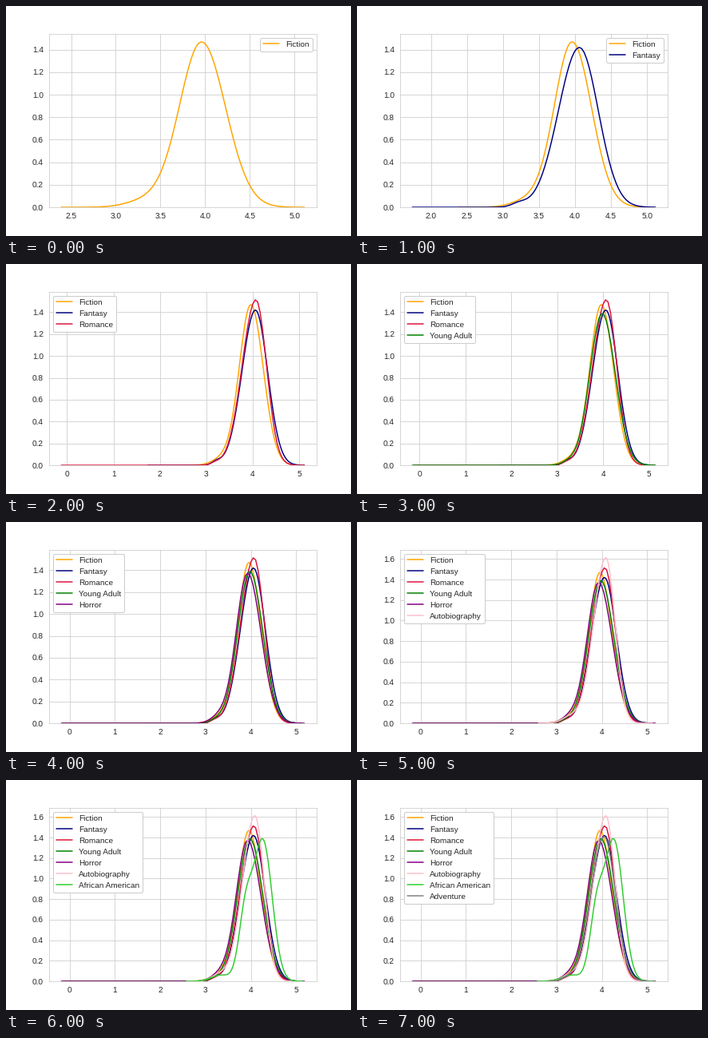
Write a matplotlib script that moves like this. It is 432 px wide and 288 px high and loops after 8 s.

```python
import numpy as np
import matplotlib.pyplot as plt
from matplotlib.animation import FuncAnimation

plt.rcParams.update({
    "font.family": "Liberation Sans",
    "font.size": 10,
    "text.color": "0.15",
    "text.hinting": "native",
    "axes.edgecolor": "0.8",
    "axes.axisbelow": True,
    "axes.grid": True,
    "grid.color": "0.8",
    "grid.linestyle": "-",
    "xtick.color": "0.15",
    "ytick.color": "0.15",
    "xtick.bottom": False,
    "ytick.left": False,
    "lines.solid_capstyle": "round",
    "legend.framealpha": 1,
})

curves = []


def bell(x, height, centre, left, right):
    """Gaussian with its own width on each side."""
    width = np.where(x < centre, left, right)
    return height * np.exp(-0.5 * ((x - centre) / width) ** 2)


def add(name, color, lo, hi, *bells):
    x = np.linspace(lo, hi, 100)
    curves.append((name, color, x, sum(bell(x, *b) for b in bells)))


# Each density is a main bell plus a small foot on its left side.
add("Fiction", "orange", 2.39, 5.11,
    (1.468, 3.96, .247, .268), (.06, 3.35, .22, .22))
add("Fantasy", "navy", 1.742, 5.114,
    (1.42, 4.06, .29, .262), (.03, 3.22, .1, .1))
add("Romance", "crimson", -.125, 5.113,
    (1.515, 4.07, .296, .228), (.02, 3.2, .1, .1))
add("Young Adult", "green", -.16, 5.14,
    (1.39, 3.98, .27, .285), (.03, 3.25, .15, .15))
add("Horror", "purple", -.185, 5.183,
    (1.375, 3.93, .253, .295), (.06, 3.3, .18, .18))
add("Autobiography", "pink", 2.6, 5.12,
    (1.613, 4.09, .275, .204), (.06, 3.3, .18, .18))
add("African American", "limegreen", 2.57, 5.15,
    (1.36, 4.27, .2, .203), (.66, 3.89, .15, .15), (.06, 3.35, .22, .22))
add("Adventure", "gray", 2.8, 5.05,
    (1.41, 4.05, .295, .25), (.03, 3.25, .12, .12))

fig, ax = plt.subplots(figsize=(6, 4), dpi=72)
fig.subplots_adjust(left=0.125, right=0.9, bottom=0.125, top=0.88)


def draw(frame):
    """Show one more genre each second; the axes rescale to fit."""
    ax.clear()
    shown = curves[:frame + 1]
    for name, color, x, y in shown:
        ax.plot(x, y, color=color, lw=1.5, label=name)
    ax.set_ylim(0, 1.05 * max(y.max() for *_, y in shown))
    ax.legend(loc="best")
    return ax.get_children()


anim = FuncAnimation(fig, draw, frames=len(curves), interval=1000,
                     repeat=True, repeat_delay=0)
plt.show()
```
